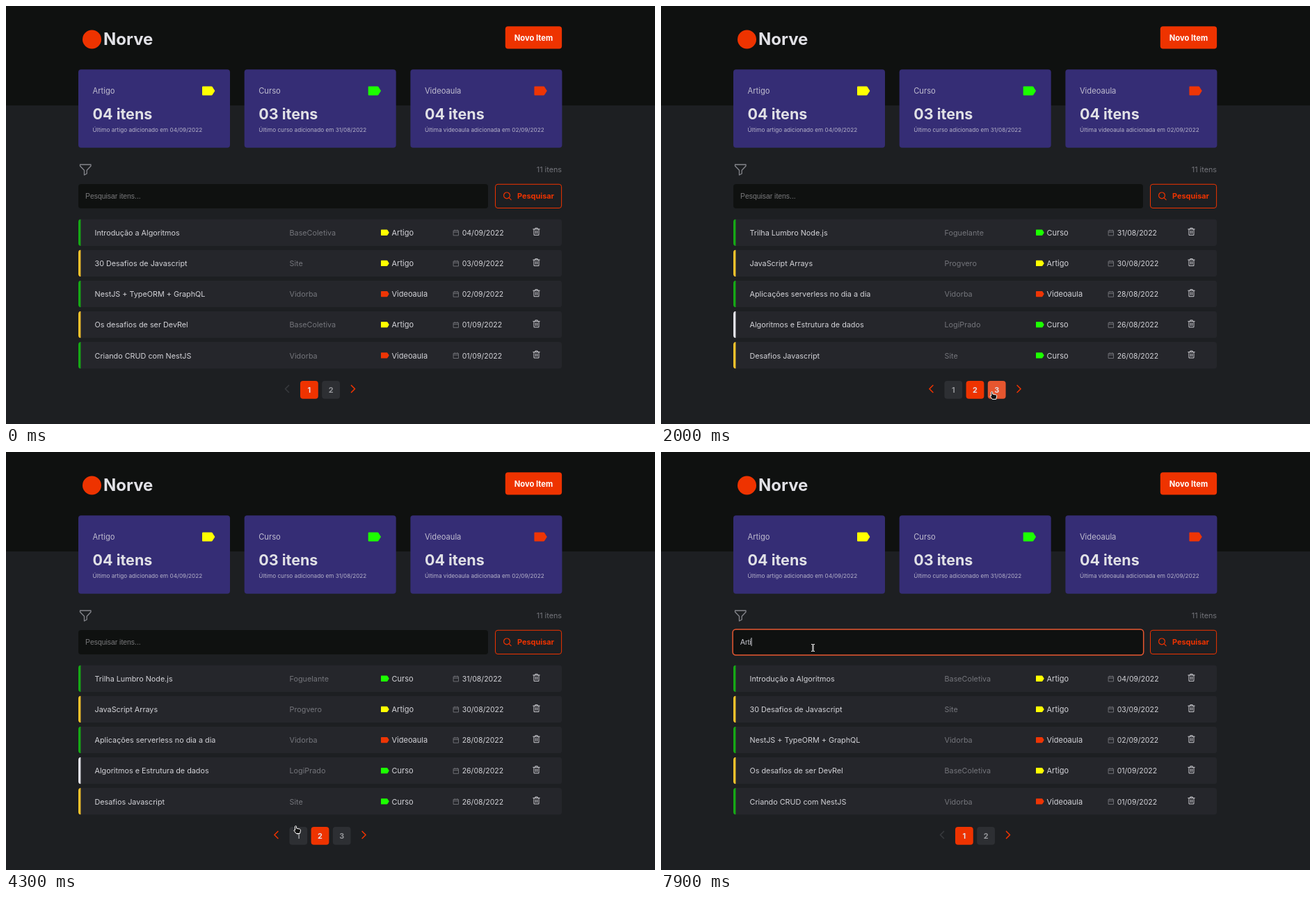
These frames come from a looping animation (933x601 px, 8000 ms). An HTML page:

```html
<!DOCTYPE html>
<html lang="pt-BR">
<head>
<meta charset="utf-8">
<style>
html, body { margin: 0; width: 100%; height: 100%; overflow: hidden; background: #1d1f22; }
svg { display: block; width: 933px; height: 601px; font-family: Montserrat, Inter, sans-serif; }
.input { font-family: "Liberation Sans", Arial, sans-serif; }
</style>
</head>
<body>
<svg viewBox="0 0 933 601"><g id="base"></g><g id="live"></g></svg>
<script>
const RED = '#ee3300', HOVER = '#e6562f', LIGHT = '#e1e1e6', DARK = '#0f1110', MUTED = '#74757b';
const BARS = { g: '#16a816', y: '#f6c22c', b: '#2ba3e0', w: LIGHT };
const TAGS = { Artigo: '#ffff00', Curso: '#1cff00', Videoaula: '#ee3505' };
const PAGES = {
  1: [
    ['g', 'Introdução a Algoritmos', 'BaseColetiva', 'Artigo', '04/09/2022'],
    ['y', '30 Desafios de Javascript', 'Site', 'Artigo', '03/09/2022'],
    ['g', 'NestJS + TypeORM + GraphQL', 'Vidorba', 'Videoaula', '02/09/2022'],
    ['y', 'Os desafios de ser DevRel', 'BaseColetiva', 'Artigo', '01/09/2022'],
    ['g', 'Criando CRUD com NestJS', 'Vidorba', 'Videoaula', '01/09/2022']
  ],
  2: [
    ['g', 'Trilha Lumbro Node.js', 'Foguelante', 'Curso', '31/08/2022'],
    ['y', 'JavaScript Arrays', 'Progvero', 'Artigo', '30/08/2022'],
    ['g', 'Aplicações serverless no dia a dia', 'Vidorba', 'Videoaula', '28/08/2022'],
    ['w', 'Algoritmos e Estrutura de dados', 'LogiPrado', 'Curso', '26/08/2022'],
    ['y', 'Desafios Javascript', 'Site', 'Curso', '26/08/2022']
  ],
  3: [['b', 'Performance no React com memo', 'Vidorba', 'Videoaula', '25/08/2022']]
};
const CARDS = [
  ['Artigo', '04', 'Último artigo adicionado em 04/09/2022'],
  ['Curso', '03', 'Último curso adicionado em 31/08/2022'],
  ['Videoaula', '04', 'Última videoaula adicionada em 02/09/2022']
];

// [time, value] steps and [time, x, y] pointer stops
const PAGER = [[0, 1], [1500, 2], [2300, 3], [3700, 2], [4800, 1]];
const LIST = [[0, 1], [1700, 2], [2400, 3], [3800, 2], [4900, 1]];
const TYPED = [[0, ''], [6800, 'A'], [7200, 'Ar'], [7400, 'Art'], [7900, 'Arti']];
const PATH = [
  [400, 825, 254], [1200, 467, 543], [1600, 466.5, 554], [2100, 478, 554.5], [2700, 478, 554.5],
  [3600, 434.5, 380], [3800, 432, 407], [4300, 416.5, 537.5], [4700, 423, 554], [4800, 423, 560],
  [4900, 300, 379], [5000, 300, 379], [5200, 220, 295], [5500, 218.5, 281.5]
];

const rect = (x, y, w, h, fill, r = 0, more = '') =>
  `<rect x="${x}" y="${y}" width="${w}" height="${h}" rx="${r}" fill="${fill}" ${more}/>`;
const text = (x, y, s, size, fill, weight = 400, more = '') =>
  `<text x="${x}" y="${y}" font-size="${size}" font-weight="${weight}" fill="${fill}" ${more}>${s}</text>`;
const line = (x, y, d, color, width = 1) =>
  `<path transform="translate(${x} ${y})" d="${d}" fill="none" stroke="${color}" stroke-width="${width}" stroke-linecap="round" stroke-linejoin="round"/>`;
const tag = (x, y, k, color) =>
  `<path transform="translate(${x} ${y}) scale(${k})" d="M1 0H13.4Q14.2 0 14.7 .7L18.4 6.5L14.7 12.3Q14.2 13 13.4 13H1Q0 13 0 12V1Q0 0 1 0Z" fill="${color}"/>`;
const middle = 'text-anchor="middle"';

function drawBase() {
  let s = rect(0, 0, 933, 143, DARK) +
    `<circle cx="123.5" cy="48" r="13.5" fill="${RED}"/>` +
    text(140, 56, 'Norve', 24, LIGHT, 700) +
    rect(717.8, 29.3, 81.3, 32.3, RED, 4) + text(758.5, 49.5, 'Novo Item', 11.2, '#fff', 700, middle);
  CARDS.forEach(([name, count, note], i) => {
    const x = 104 + i * 238.7;
    s += rect(x, 91.2, 218, 112.6, '#352d75', 4) +
      text(x + 20.5, 126, name, 11.2, '#bfbccf') + tag(x + 178, 115.5, 1, TAGS[name]) +
      text(x + 20.5, 162.5, count + ' itens', 21.5, LIGHT, 700) +
      text(x + 20.5, 181, note, 8.2, '#b5b2c9');
  });
  return s + line(106.5, 228, 'M0 0H15.5V2L9.7 8.3V13L6 15V8.3L0 2Z', '#85868c', 1.3) +
    text(799, 239, '11 itens', 10.8, MUTED, 400, 'text-anchor="end"') +
    rect(703.5, 256.3, 95.1, 34.2, 'none', 3.5, `stroke="${RED}"`) +
    line(715.5, 268, 'M8.9 4.4A4.4 4.4 0 1 1 .1 4.4A4.4 4.4 0 1 1 8.9 4.4M7.8 7.8L10.6 10.6', RED, 1.2) +
    text(735, 277, 'Pesquisar', 10.9, RED, 700);
}

function drawRow([bar, title, site, kind, date], i) {
  const y = 306.4 + i * 44.15;
  return `<g clip-path="inset(0 round 4px)">${rect(104, y, 695, 38.6, '#25262b')}${rect(104, y, 3.4, 38.6, BARS[bar])}</g>` +
    text(127.5, y + 23.6, title, 10.8, '#d3d3d8') +
    text(407.5, y + 23.6, site, 10.8, MUTED) +
    tag(539, y + 15.2, .64, TAGS[kind]) + text(554.5, y + 23.6, kind, 11, '#d3d3d8') +
    line(643.5, y + 15.5, 'M0 1H7V8H0ZM0 3.3H7M1.8 0V1.5M5.2 0V1.5', MUTED, .9) +
    text(655.7, y + 23.6, date, 10.5, '#d3d3d8') +
    line(757.8, y + 12.5, 'M0 2H9.4M1.2 2V10.5H8.2V2M3 2V.4H6.4V2M3.6 4.4V8.2M5.8 4.4V8.2', '#c9c9ce');
}

const valueAt = (steps, t) => steps.filter(s => s[0] <= t).pop()[1];

function pointerAt(t) {
  const i = PATH.findIndex(p => p[0] > t);
  if (i < 0) return PATH[PATH.length - 1].slice(1);
  const [t0, x0, y0] = PATH[i - 1], [t1, x1, y1] = PATH[i], k = (t - t0) / (t1 - t0);
  return [x0 + (x1 - x0) * k, y0 + (y1 - y0) * k];
}

function drawPager(page, y, [px, py]) {
  const nums = [1, 2, 3].filter(n => Math.abs(n - page) < 2);
  const left = 451.5 - nums.length * 15.6 + 2.7, arm = nums.length * 15.6 + 15.8;
  let over = false;
  let s = line(451.5 - arm + 2, y + 6.5, 'M0 0L-5 5L0 10', page > 1 ? RED : '#37393d', 1.6) +
    line(451.5 + arm - 2, y + 6.5, 'M0 0L5 5L0 10', page < 3 ? RED : '#37393d', 1.6);
  nums.forEach((n, i) => {
    const x = left + i * 31.2;
    const near = m => px > x - m && px < x + 26 + m && py > y - m && py < y + 26 + m;
    over = over || near(2);
    const on = n === page, hot = near(0);
    s += rect(x, y, 25.8, 25.8, on ? RED : hot ? HOVER : '#2d2f33', 4) +
      text(x + 12.9, y + 16.8, n, 10.8, on || hot ? LIGHT : '#96979b', 700, middle);
  });
  return [s, over];
}

function drawPointer([x, y], kind) {
  const shape = {
    arrow: ['M0 0V10.6L2.5 8.4L4.2 12.2L6 11.4L4.3 7.7H7.6Z', '#111', '#fff', .9],
    hand: ['M-1 .6Q0 -.6 1 .6V3.6L6 4.7Q7.3 5.2 7 6.8L6 11H.6L-2.6 6.8Q-2.5 5.5 -1 6.4Z', '#111', '#fff', 1],
    beam: ['M-2.5 -5H-.5V5H-2.5M2.5 -5H.5V5H2.5', '#111', '#e8e8e8', 1]
  }[kind];
  return `<path transform="translate(${x} ${y})" d="${shape[0]}" fill="${shape[1]}" stroke="${shape[2]}" stroke-width="${shape[3]}" stroke-linejoin="round"/>`;
}

function drawInput(t) {
  const focus = t >= 5500, typed = valueAt(TYPED, t);
  const caret = focus && (t < 6500 || t >= 6800);
  return rect(104, 256, 589, 35, DARK, 4) +
    (focus ? rect(103.1, 254.9, 590.6, 37.1, 'none', 4.5, `stroke="${HOVER}" stroke-width="1.5"`) : '') +
    text(114, 276.5, typed || 'Pesquisar itens...', 10.4, typed ? '#c4c4cc' : '#7a7a7c', 400, 'class="input" id="typed"') +
    (caret ? rect(114, 267, .9, 12, LIGHT, 0, 'id="caret"') : '');
}

const base = document.getElementById('base'), live = document.getElementById('live');
base.innerHTML = drawBase();

function draw(t) {
  const rows = PAGES[valueAt(LIST, t)];
  const shown = t >= 400, pos = shown ? pointerAt(t) : [-99, -99];
  const [pager, over] = drawPager(valueAt(PAGER, t), 318.2 + rows.length * 44.15, pos);
  const inInput = pos[0] > 104 && pos[0] < 693 && pos[1] > 256 && pos[1] < 291;
  const kind = over ? 'hand' : inInput ? 'beam' : 'arrow';
  live.innerHTML = drawInput(t) + rows.map(drawRow).join('') + pager + (shown ? drawPointer(pos, kind) : '');
  const caret = document.getElementById('caret'), typed = valueAt(TYPED, t);
  if (caret && typed) caret.setAttribute('x', 114 + document.getElementById('typed').getComputedTextLength());
}

// The screen advances ten times a second
let last = -1;
function tick(now) {
  const t = Math.floor(now % 8000 / 100) * 100;
  if (t !== last) draw(last = t);
  requestAnimationFrame(tick);
}
requestAnimationFrame(tick);
</script>
</body>
</html>
```
